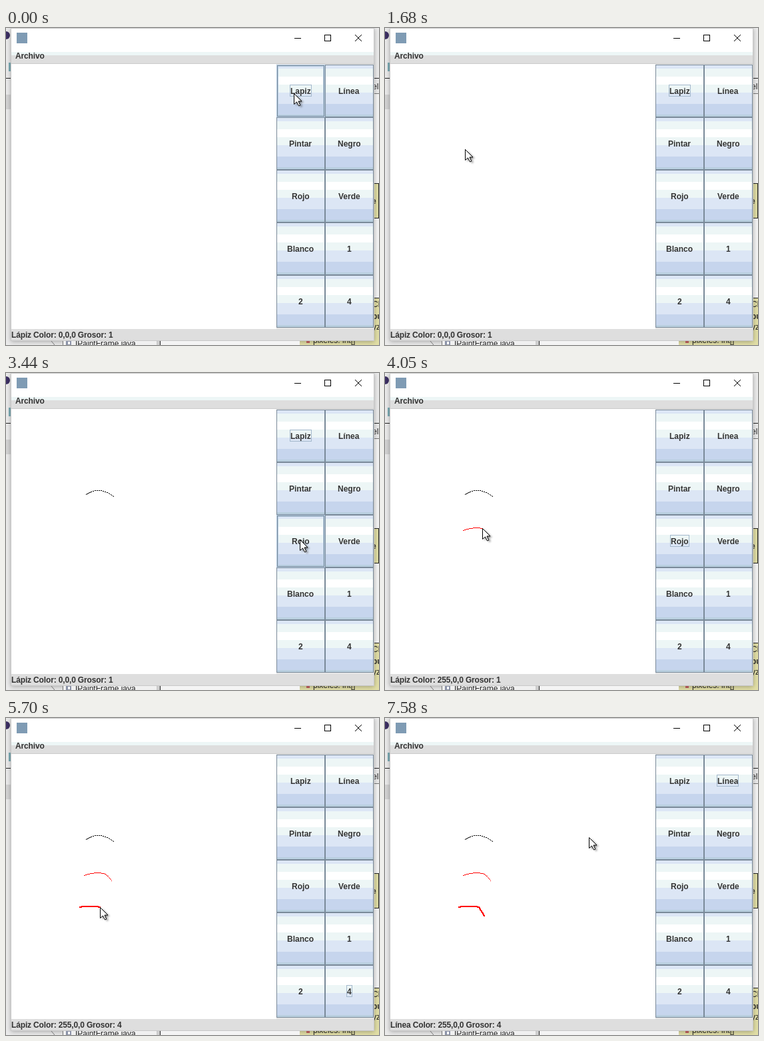
These frames come from a looping animation (560 by 476 pixels, 8 s). An HTML page with a canvas:

```html
<!DOCTYPE html>
<html lang="es">
<head>
<meta charset="utf-8">
<title>Paint</title>
<style>
html, body { margin: 0; width: 560px; height: 476px; overflow: hidden; background: #fff; }
canvas { display: block; }
</style>
</head>
<body>
<canvas id="stage" width="560" height="476"></canvas>
<script>
const LOOP = 8000;
const FACE = '"Liberation Sans", Arial, sans-serif';
const EDGE = '#7a8a99', LIGHT = '#b8cfe5', GREY = '#dedede', INK = '#333';
const ctx = document.getElementById('stage').getContext('2d');

const labels = ['Lapiz', 'Línea', 'Pintar', 'Negro', 'Rojo', 'Verde', 'Blanco', '1', '2', '4'];
const buttons = labels.map((text, i) => ({
  text, x: 406 + (i % 2) * 73, y: 55 + Math.floor(i / 2) * 79, w: 73, h: 79
}));

// Pointer moves; bend pulls the middle of the way down (or up, if negative)
const origin = { x: 432, y: 98 };
const moves = [
  { from: 70, to: 630, x: 114, y: 181 },
  { from: 1125, to: 1220, x: 120, y: 182 },
  { from: 1680, to: 2820, x: 161, y: 185, bend: -15, pen: true },
  { from: 3130, to: 3360, x: 441, y: 250 },
  { from: 3480, to: 3720, x: 117, y: 236 },
  { from: 3720, to: 4050, x: 146, y: 233, bend: -4, pen: true },
  { from: 4050, to: 4500, x: 158, y: 244, bend: -4, pen: true },
  { from: 4650, to: 4750, x: 515, y: 412 },
  { from: 4995, to: 5370, x: 111, y: 284 },
  { from: 5370, to: 5690, x: 141, y: 284, bend: -3, pen: true },
  { from: 5790, to: 6280, x: 149, y: 297, pen: true },
  { from: 6495, to: 6600, x: 510, y: 114 },
  { from: 7000, to: 7570, x: 306, y: 179, bend: 75 }
];
moves.forEach((m, i) => { m.start = i ? moves[i - 1] : origin; });

const clicks = [
  { at: 0, name: 'Lapiz', set: { tool: 'Lápiz', rgb: '0,0,0', width: 1 } },
  { at: 3450, name: 'Rojo', set: { rgb: '255,0,0' } },
  { at: 4840, name: '4', set: { width: 4 } },
  { at: 6690, name: 'Línea', set: { tool: 'Línea' } }
];

function stateAt(t) {
  return clicks.filter(c => c.at <= t)
    .reduce((state, c) => ({ ...state, ...c.set, focus: c.name }), {});
}

function rect(x, y, w, h, color) {
  ctx.fillStyle = color;
  ctx.fillRect(x, y, w, h);
}

function frame(x, y, w, h, color) {
  ctx.strokeStyle = color;
  ctx.lineWidth = 1;
  ctx.strokeRect(x + 0.5, y + 0.5, w - 1, h - 1);
}

function line(x1, y1, x2, y2, color) {
  ctx.strokeStyle = color;
  ctx.lineWidth = 1;
  ctx.beginPath();
  ctx.moveTo(x1, y1);
  ctx.lineTo(x2, y2);
  ctx.stroke();
}

function setFont(bold, space) {
  ctx.font = (bold ? 'bold ' : '') + '12px ' + FACE;
  ctx.letterSpacing = space + 'px';
}

function write(text, x, y, { bold = true, space = 0, color = INK } = {}) {
  setFont(bold, space);
  ctx.fillStyle = color;
  ctx.fillText(text, x, y);
}

function along({ start, x, y, bend = 0 }, u) {
  return [
    Math.round(start.x + (x - start.x) * u),
    Math.round(start.y + (y - start.y) * u + 2 * bend * u * (1 - u))
  ];
}

function progress({ from, to, pen }, t) {
  const u = Math.min(1, Math.max(0, (t - from) / (to - from)));
  return pen ? u : u * u * (3 - 2 * u);
}

function pointer(t) {
  const move = moves.filter(m => m.from <= t).pop();
  return move ? along(move, progress(move, t)) : [origin.x, origin.y];
}

function drawBackdrop() {
  const plain = { bold: false, color: '#222' };
  rect(0, 0, 560, 476, '#ececec');
  ctx.fillStyle = '#3c2f63';
  ctx.beginPath();
  ctx.arc(0, 11, 6, 0, 7);
  ctx.fill();
  rect(4, 52, 3, 13, '#7fb0b8');
  rect(0, 75, 560, 1, '#222');
  rect(0, 100, 8, 22, '#d4d4d4');
  write('el.', 550, 92, plain);
  rect(552, 98, 8, 1, '#777');
  rect(552, 99, 8, 306, '#f6f6f6');
  rect(540, 233, 20, 53, '#e2dfa6');
  frame(540, 233, 20, 53, '#222');
  write('e', 549, 264);
  rect(441, 405, 119, 71, '#e2dfa6');
  rect(441, 405, 119, 1, '#222');
  write('Cla', 550, 419, plain);
  write('bu', 550, 437);
  write('yza', 550, 453, plain);

  // Soft shadow around the window
  ctx.save();
  ctx.shadowColor = 'rgba(0,0,0,.3)';
  ctx.shadowBlur = 7;
  ctx.shadowOffsetY = 1;
  rect(7, 0, 546, 470, '#fff');
  ctx.restore();

  rect(85, 470, 1, 6, '#777');
  rect(86, 470, 140, 6, '#f0f0f0');
  rect(90, 470, 8, 6, '#8c93a8');
  rect(93, 471, 3, 4, '#fff');
  rect(226, 470, 5, 6, '#ccc');
  rect(231, 470, 1, 6, '#222');
  rect(232, 470, 209, 6, '#f4f4f4');
  line(68, 470, 73, 476, '#777');
  write('IPaintFrame.java', 104, 478, plain);
  rect(451, 470, 5, 3, '#a55');
  write('pixeles: int[]', 461, 473, plain);
}

function drawWindow() {
  rect(7, 0, 546, 470, '#c8c8c8');
  rect(8, 1, 544, 468, '#fff');
  rect(16, 7, 16, 16, '#7f9bb4');

  rect(433, 15, 10, 1, '#000');
  frame(478, 10, 10, 10, '#000');
  line(524, 10, 534, 20, '#000');
  line(534, 10, 524, 20, '#000');

  rect(8, 36, 544, 5, '#edf6f6');
  rect(8, 41, 544, 12, GREY);
  rect(8, 53, 544, 1, '#ccc');
  write('Archivo', 14, 46, { space: -0.15 });

  rect(406, 54, 146, 398, '#e6e6e6');
  rect(8, 452, 544, 17, GREY);
}

// Button face: a smooth gradient snapped to a small palette
const palette = [[220, 230, 245], [237, 246, 246], [255, 255, 255], [198, 213, 237], [185, 207, 223]];
const pale = [221, 232, 243], white = [255, 255, 255], deep = [184, 207, 229];

function faceColor(v) {
  const bright = 1 - Math.abs(v - 0.3) / 0.3;
  const [target, u] = v < 0.6 ? [white, bright] : [deep, (v - 0.6) / 0.4];
  const exact = pale.map((c, i) => c + (target[i] - c) * u);
  const gap = p => Math.hypot(...p.map((c, i) => c - exact[i]));
  return palette.reduce((best, p) => gap(p) < gap(best) ? p : best);
}

const face = Array.from({ length: 79 }, (_, row) => `rgb(${faceColor(row / 79)})`);

function drawButton({ text, x, y, w, h }, hover, focus) {
  face.forEach((color, row) => rect(x, y + row, w, 1, color));
  if (hover) {
    frame(x, y, w, h, LIGHT);
    frame(x + 2, y + 2, w - 4, h - 4, LIGHT);
    frame(x + 1, y + 1, w - 2, h - 2, EDGE);
  } else {
    frame(x, y, w, h, EDGE);
  }
  setFont(true, 0);
  const width = ctx.measureText(text).width;
  const left = Math.floor(x + (w - width) / 2);
  write(text, left, y + 44);
  if (focus) frame(left - 1, y + 30, Math.round(width) + 2, 18, '#a3b8cc');
}

function drawStroke(move, t) {
  if (!move.pen || t < move.from) return;
  const { rgb, width } = stateAt(move.from);
  const size = width > 1 ? 2 : 1;
  const dotted = rgb === '0,0,0';
  const steps = Math.max(Math.abs(move.x - move.start.x), Math.abs(move.y - move.start.y));
  const done = steps * progress(move, t);
  for (let k = 0; k <= done; k++) {
    const [x, y] = along(move, k / steps);
    if (dotted && k > 8 && k % 3 === 0) continue;
    rect(x - (size - 1), y - (size - 1), size, size, `rgb(${rgb})`);
  }
}

const arrow = [[0, 0], [0, 16], [4, 12.5], [7, 18.5], [9.3, 17.5], [6.5, 11.5], [11.5, 11.5]];

function drawPointer(x, y) {
  ctx.save();
  ctx.translate(x + 0.5, y + 0.5);
  ctx.beginPath();
  arrow.forEach(p => ctx.lineTo(...p));
  ctx.closePath();
  ctx.shadowColor = 'rgba(0,0,0,.45)';
  ctx.shadowBlur = 3;
  ctx.shadowOffsetX = 3;
  ctx.shadowOffsetY = 2;
  ctx.fillStyle = '#fff';
  ctx.fill();
  ctx.shadowColor = 'transparent';
  ctx.strokeStyle = '#000';
  ctx.lineWidth = 1;
  ctx.stroke();
  ctx.restore();
}

function draw(t) {
  const [x, y] = pointer(t);
  const { tool, rgb, width, focus } = stateAt(t);
  drawBackdrop();
  drawWindow();
  buttons.forEach(b => {
    const hover = x >= b.x && x < b.x + b.w && y >= b.y && y < b.y + b.h;
    drawButton(b, hover, b.text === focus);
  });
  write(`${tool} Color: ${rgb} Grosor: ${width}`, 8, 465, { space: -0.15 });
  moves.forEach(m => drawStroke(m, t));
  drawPointer(x, y);
}

const start = performance.now();
function tick(now) {
  draw(Math.max(0, now - start) % LOOP);
  requestAnimationFrame(tick);
}
draw(0);
requestAnimationFrame(tick);
</script>
</body>
</html>
```
